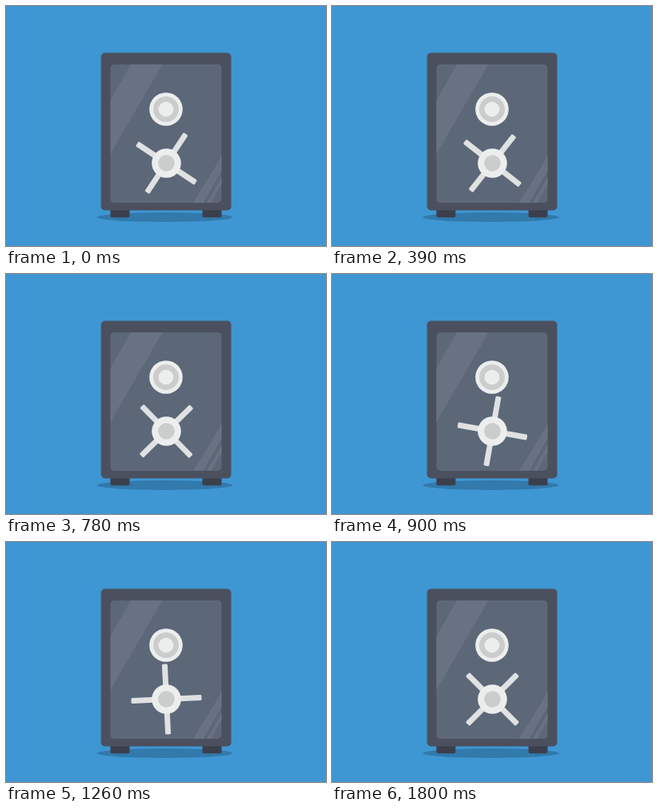
Animation, 400 px wide and 300 px high, one loop 3600 ms. Source, as an HTML page:

```html
<!DOCTYPE html>
<html lang="en">
<head>
<meta charset="utf-8">
<title>Safe</title>
<style>
html, body { margin: 0; width: 100%; height: 100%; overflow: hidden; background: #3e97d3; }
svg { display: block; width: 100%; height: 100%; }
</style>
</head>
<body>
<svg viewBox="0 0 400 300">
  <defs>
    <clipPath id="door"><rect x="130.5" y="73" width="139" height="173" rx="5"/></clipPath>
  </defs>
  <rect width="400" height="300" fill="#3e97d3"/>
  <ellipse cx="198.5" cy="264" rx="85" ry="6" fill="#3279ac"/>
  <g fill="#3b3f4b">
    <rect x="130.5" y="250" width="24" height="14.3" rx="2"/>
    <rect x="245.5" y="250" width="24" height="14.3" rx="2"/>
  </g>
  <rect x="118.7" y="58.5" width="162.8" height="197" rx="5" fill="#4b505f"/>
  <g clip-path="url(#door)">
    <rect x="130" y="72" width="140" height="175" fill="#5c6778"/>
    <g fill="#697282">
      <path d="M156 73H195.500L130 186V119Z"/>
      <path d="M234 246H246.500L270 205V187Z"/>
      <path d="M251 246H256.500L270 222V213Z"/>
    </g>
  </g>
  <circle cx="200" cy="129" r="20.800" fill="#eceeee"/>
  <circle cx="200" cy="129" r="16" fill="#cbcdcd"/>
  <circle cx="200" cy="129" r="9.300" fill="#eceeee"/>
  <g transform="translate(200.5 196.500)">
    <g id="arms" fill="#dfe1e2">
      <rect x="-3.500" y="-44" width="7" height="88" rx="1.500"/>
      <rect x="-44" y="-3.500" width="88" height="7" rx="1.500"/>
    </g>
    <circle r="18.300" fill="#eceeee"/>
    <circle r="10.300" fill="#cbcdcd"/>
  </g>
</svg>
<script>
const LOOP = 3600, TICK = 30;
const arms = document.getElementById('arms');

// Each turn: start and end time in ms, start and end angle, easing power.
const turns = [
  { start: 30, end: 470, from: 33.5, to: 135, power: 2 },
  { start: 470, end: 984, from: 135, to: 0, power: 1.7 },
  { start: 1080, end: 1800, from: 0, to: -45, power: 3 }
];

const easeInOut = (p, power) => p < 0.5
  ? (2 * p) ** power / 2
  : 1 - (2 - 2 * p) ** power / 2;

function angleAt(time) {
  let angle = turns[0].from;
  for (const { start, end, from, to, power } of turns) {
    if (time < start) break;
    const progress = Math.min(1, (time - start) / (end - start));
    angle = from + (to - from) * easeInOut(progress, power);
  }
  return angle;
}

function draw() {
  const time = Math.floor(performance.now() % LOOP / TICK) * TICK;
  arms.setAttribute('transform', `rotate(${angleAt(time)})`);
  requestAnimationFrame(draw);
}
draw();
</script>
</body>
</html>
```
